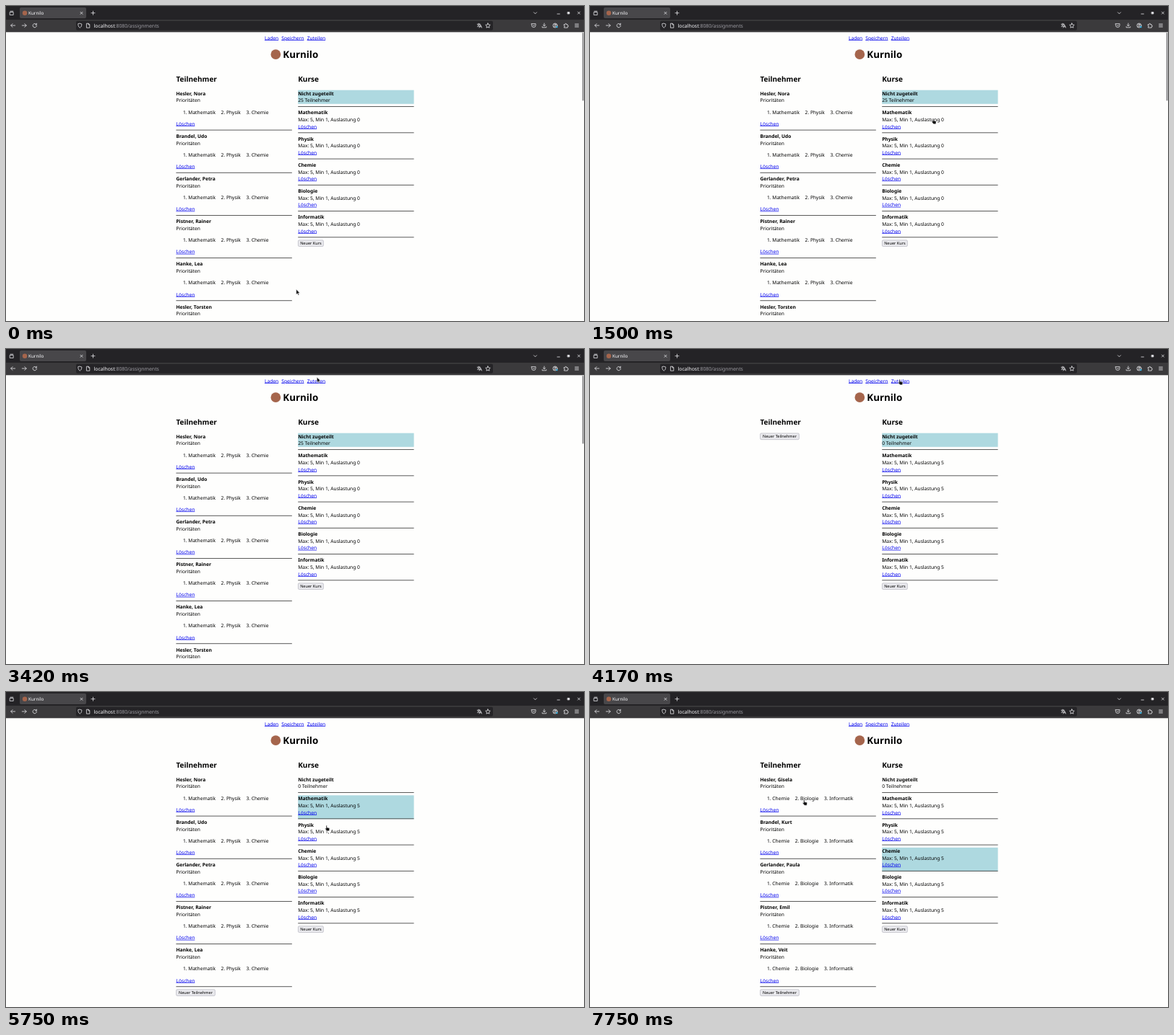
These frames come from a looping animation (800 px wide and 437 px high, 8000 ms). An HTML page:

```html
<!DOCTYPE html>
<html lang="de">
<head>
<meta charset="utf-8">
<title>Kurnilo</title>
<style>
html, body { margin: 0; width: 100%; height: 100%; overflow: hidden; background: #fefefd; }
svg { display: block; width: 800px; height: 437px; }
text { font-family: "Noto Sans", sans-serif; font-size: 16px; text-rendering: geometricPrecision; }
.b { font-weight: 700; }
.h1 { font-weight: 700; font-size: 32px; }
.h2 { font-weight: 700; font-size: 24px; }
.a { fill: #0000ee; text-decoration: underline; }
.btn { font-size: 13.33px; text-anchor: middle; }
.ui { font-size: 6.9px; fill: #fbfbfe; }
.icon { fill: none; stroke: #e6e6ea; stroke-width: .8; stroke-linecap: round; stroke-linejoin: round; }
</style>
</head>
<body>
<svg viewBox="0 0 800 437" xmlns="http://www.w3.org/2000/svg">
  <rect width="800" height="437" fill="#fefefd"/>
  <g id="page" transform="scale(.416667)"></g>
  <rect id="bar" x="797.8" y="37" width="1.6" height="94.5" rx=".8" fill="#77777a"/>

  <rect width="800" height="19" fill="#242326"/>
  <rect y="19" width="800" height="17.3" fill="#3b3a3c"/>
  <rect x="19" y="2" width="92" height="15" rx="2" fill="#48474a"/>
  <rect x="97" y="20.7" width="577" height="13" rx="2" fill="#252427"/>
  <circle cx="26" cy="9.7" r="3.2" fill="#a5654c"/>
  <text class="ui" x="31" y="12" style="font-size:6.3px">Kurnilo</text>
  <text class="ui" x="121.5" y="29.6">localhost<tspan fill="#9d9ca3">:8080/assignments</tspan></text>
  <g class="icon">
    <path d="M5.6 8.6h4.6v3.8h-4.6zM6 7.2h3.8M103 8.3l3 3m0-3l-3 3M118 9.7h5m-2.5-2.5v5"/>
    <path d="M730.5 8.8l2 2 2-2M763 11h3.4M791.4 8.1l3 3m0-3l-3 3"/>
    <path d="M777.5 8.5h2.4v2.4h-2.4z" fill="#e6e6ea"/>
    <path d="M12.6 27h-5.8m2.3-2.4l-2.4 2.4 2.4 2.4M22.3 27h5.8m-2.3-2.4l2.4 2.4-2.4 2.4"/>
    <path d="M41.9 25.4a2.7 2.7 0 1 0 .6 2M42.4 24.2v1.8h-1.8"/>
    <path d="M102.3 24.2l2.5.8c0 2.5-.6 4-2.5 5.2-1.9-1.2-2.5-2.7-2.5-5.2z"/>
    <path d="M111.8 24.2h2.5l1.5 1.5v4.5h-4zM114 24.4v1.6h1.6"/>
    <path d="M652.3 25.2h4m-2-1v1m1.2 0c-.4 1.8-1.4 2.8-3 3.5m.5-2.4c.4 1 1 1.6 1.8 2.1M655 30l1.7-4 1.7 4m-2.8-1.3h2.2"/>
    <path d="M667 23.9l1 2.1 2.3.3-1.7 1.6.4 2.3-2-1.1-2 1.1.4-2.3-1.7-1.6 2.3-.3z"/>
    <path d="M727.5 24.6h5.6v2.2a2.8 2.8 0 0 1-5.6 0zM729 26.4l1.3 1.2 1.3-1.2"/>
    <path d="M745 24v3.8m-1.6-1.6l1.6 1.6 1.6-1.6M742.2 28.6v1.2h5.6v-1.2"/>
    <circle cx="760" cy="27" r="3"/><circle cx="760" cy="26" r="1"/>
    <path d="M758.2 29c.8-1.4 2.8-1.4 3.6 0"/>
    <path d="M772.6 25.6h1.4c-.4-1.8 2-1.8 1.6 0h1.6v1.5c1.7-.4 1.7 1.9 0 1.6v1.4h-4.6v-1.4c1.3.2 1.3-1.8 0-1.6z"/>
    <path d="M787.6 25h4.8m-4.8 2h4.8m-4.8 2h4.8"/>
  </g>
  <circle cx="762.4" cy="29" r="1.2" fill="#35b6e8"/>
  <path id="cur" fill="#111" stroke="#fff" stroke-width=".5" stroke-linejoin="round"/>
</svg>
<script>
const LOOP = 8000, SCALE = 2.4, LINE = 23, LEFT = 565, RIGHT = 970, COL = 385, TOP = 280;
const COURSES = ["Mathematik", "Physik", "Chemie", "Biologie", "Informatik"];
const LAST = ["Hesler", "Brandel", "Gerlander", "Pistner", "Hanke"];
const FIRST = ["Nora", "Udo", "Petra", "Rainer", "Lea",
  "Torsten", "Grit", "Holger", "Irina", "Jana",
  "Gisela", "Kurt", "Paula", "Emil", "Veit"];

// start time, selected box, first person, people shown, load per course
const STATES = [
  { t: 0, sel: 0, from: 0, n: 6, load: 0 },
  { t: 1920, sel: 1, from: 0, n: 0, load: 0 },
  { t: 2830, sel: 0, from: 0, n: 6, load: 0 },
  { t: 4170, sel: 0, from: 0, n: 0, load: 5 },
  { t: 5250, sel: 1, from: 0, n: 5, load: 5 },
  { t: 6080, sel: 2, from: 5, n: 5, load: 5 },
  { t: 6580, sel: 3, from: 10, n: 5, load: 5 }
];

// pointer stops: time, x, y
const STOPS = [
  [0, 401.7, 393], [80, 401.7, 393], [830, 438, 285], [1450, 474.3, 156], [1980, 474.3, 156],
  [2330, 467, 138.5], [2670, 446, 125], [2830, 446, 125], [3400, 430.3, 39], [3500, 430.3, 39],
  [3750, 428, 41], [3920, 428, 42], [4250, 428, 42], [4650, 463, 175], [4900, 449.8, 150.5],
  [5330, 449.8, 150.5], [5740, 443, 185], [6170, 443, 185], [6330, 439, 222], [7000, 438, 222],
  [7420, 252, 149.5], [7740, 295.7, 149.5], [LOOP, 295.7, 149.5]
];
const ARROW = "M0 0V7.2L1.7 5.7 2.8 8.2 4 7.7 2.9 5.3H5Z";
const HAND = "M0 .8C0-.3 1.3-.3 1.3 .8V3L4 3.6C4.7 3.8 4.9 4.2 4.8 5L4.4 7.8H1.2L-1.2 5C-1.7 4.3-.8 3.8-.2 4.3L0 4.6Z";

const page = document.getElementById("page");
const bar = document.getElementById("bar");
const cur = document.getElementById("cur");

const text = (x, y, s, cls = "") => `<text class="${cls}" x="${x}" y="${y}">${s}</text>`;
const rect = (x, y, w, h, attrs) => `<rect x="${x}" y="${y}" width="${w}" height="${h}" ${attrs}/>`;
const rule = (x, y) => rect(x, y, COL, 2, 'fill="#3a3a3a"');
const mark = (y, h) => rect(RIGHT, y, COL, h, 'fill="#aed9e0"');
const button = (x, y, w, s) =>
  rect(x + .5, y + .5, w - 1, 21, 'rx="3.5" fill="#e9e9ed" stroke="#8f8f9d"') +
  text(x + w / 2, y + 15.5, s, "btn");
const courseTop = i => TOP + 64 + i * 87;

function person(i, row) {
  const y = TOP + row * 142, group = Math.floor(i / 5);
  const wishes = [0, 1, 2].map(k =>
    `<tspan dx="${k ? 18 : 0}">${k + 1}. ${COURSES[group + k]}</tspan>`).join("");
  return text(LEFT, y + 17, `${LAST[i % 5]}, ${FIRST[i]}`, "b") +
    text(LEFT, y + 40, "Prioritäten") +
    text(588, y + 79, wishes) +
    text(LEFT, y + 118, "Löschen", "a") + rule(LEFT, y + 132);
}

function course(name, i, s) {
  const y = courseTop(i);
  return (s.sel === i + 1 ? mark(y, 79) : "") +
    text(RIGHT, y + 17, name, "b") +
    text(RIGHT, y + 40, `Max: 5, Min 1, Auslastung ${s.load}`) +
    text(RIGHT, y + 63, "Löschen", "a") + rule(RIGHT, y + 77);
}

function drawPage(s) {
  let out = text(859, 112, "Laden", "a") + text(915, 112, "Speichern", "a") +
    text(1000, 112, "Zuteilen", "a") +
    '<circle cx="896" cy="161" r="16.5" fill="#a5654c"/>' + text(920, 172, "Kurnilo", "h1") +
    text(LEFT, 251, "Teilnehmer", "h2") + text(RIGHT, 251, "Kurse", "h2");
  for (let r = 0; r < s.n; r++) out += person(s.from + r, r);
  if (s.n < 6) out += button(LEFT, TOP + s.n * 142, 130, "Neuer Teilnehmer");
  if (s.sel === 0) out += mark(TOP, 2 * LINE);
  out += text(RIGHT, TOP + 17, "Nicht zugeteilt", "b") +
    text(RIGHT, TOP + 40, `${25 - 5 * s.load} Teilnehmer`) + rule(RIGHT, TOP + 54);
  out += COURSES.map((c, i) => course(c, i, s)).join("") +
    button(RIGHT, courseTop(5), 85, "Neuer Kurs");
  page.innerHTML = out;
  bar.style.display = s.n > 5 ? "" : "none";
}

function pointer(t) {
  const i = Math.max(1, STOPS.findIndex(p => p[0] > t));
  const [t0, x0, y0] = STOPS[i - 1], [t1, x1, y1] = STOPS[i];
  const u = (t - t0) / (t1 - t0), e = u * u * (3 - 2 * u);
  return [x0 + (x1 - x0) * e, y0 + (y1 - y0) * e];
}

function clickable(px, py, s) {
  const x = px * SCALE, y = py * SCALE;
  if (y > 95 && y < 117) return x > 1000 && x < 1061;
  if (y < TOP) return false;
  if (x > LEFT && x < LEFT + COL) {
    const d = y - TOP;
    return d < s.n * 142 && d % 142 < 134;
  }
  if (x < RIGHT || x > RIGHT + COL) return false;
  if (y < TOP + 2 * LINE) return true;
  const d = y - courseTop(0);
  return d >= 0 && d < 435 && d % 87 < 79;
}

let shown = null;
function frame(now) {
  const t = now % LOOP;
  const s = STATES.filter(v => v.t <= t).pop();
  if (s !== shown) drawPage(shown = s);
  const [x, y] = pointer(t);
  cur.setAttribute("d", clickable(x, y, s) ? HAND : ARROW);
  cur.setAttribute("transform", `translate(${x.toFixed(2)} ${y.toFixed(2)})`);
}

const start = performance.now();
function tick() {
  frame(performance.now() - start);
  requestAnimationFrame(tick);
}
tick();
</script>
</body>
</html>
```
